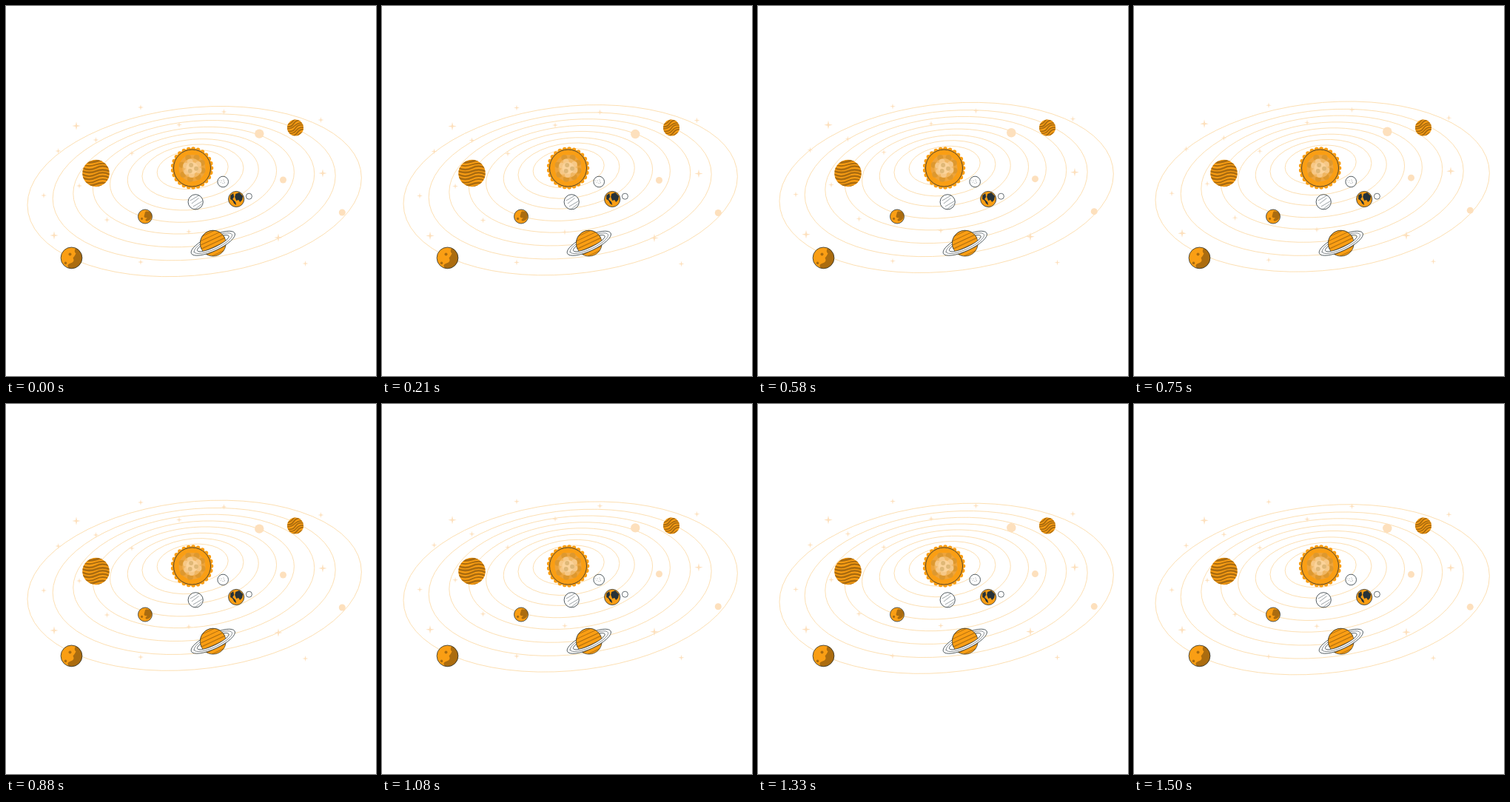
An HTML page for the animation above (1.54 s loop, 500 by 500 pixels).

```html
<!DOCTYPE html>
<html lang="en">
<head>
<meta charset="utf-8">
<title>Planets</title>
<style>
  html, body { margin: 0; width: 100%; height: 100%; overflow: hidden; background: #fff; }
  svg { display: block; width: 100%; height: 100%; }
  .line { fill: none; stroke-linecap: round; }
</style>
</head>
<body>
<svg id="stage" viewBox="0 0 500 500"></svg>
<script>
const ORANGE = '#fa9e14', BROWN = '#ab6c0f', DARK = '#263238';
const LOOP = 1540;

let seed = 7;
const random = () => (seed = seed * 16807 % 2147483647) / 2147483647;
const range = (n, make) => Array.from({ length: n }, (_, i) => make(i)).join('');

const circle = (x, y, r, attrs = '') => `<circle cx="${x}" cy="${y}" r="${r}" ${attrs}/>`;
const disc = (r, color) => circle(0, 0, r, `fill="${color}"`);
const rim = (r, width) => circle(0, 0, r, `fill="none" stroke="${DARK}" stroke-width="${width}"`);
const fill = (d, color) => `<path d="${d}" fill="${color}"/>`;
const line = (d, color, width) =>
  `<path class="line" d="${d}" stroke="${color}" stroke-width="${width}"/>`;

// Evenly spaced spots of varying distance around the centre.
const spots = (n, near, far, size, color) => range(n, i => {
  const angle = (i + random() * 0.6) * 2 * Math.PI / n;
  const d = near + (far - near) * random();
  return circle(d * Math.cos(angle), d * Math.sin(angle), size, `fill="${color}"`);
});

// Parallel wavy bands across a globe of radius r.
const bands = (r, gap, width, swing, angle = 0) => `<g transform="rotate(${angle})">` +
  range(Math.ceil(2 * r / gap), i => {
    const y = gap * (i + 0.5) - r, bend = swing * (0.7 + 0.6 * random());
    return line(`M${-r} ${y}q${r / 2} ${bend} ${r} 0t${r} 0`, BROWN, width * (0.7 + 0.6 * random()));
  }) + '</g>';

// Orbits share one tilt; height and centre follow from the half width.
const orbit = w => `<ellipse rx="${w}" ry="${0.56 * w - 0.00025 * w * w}"
  transform="matrix(1 -.081 0 1 ${251.5 + 0.014 * w} ${213.3 + 0.166 * w})"/>`;

const star = r => ([x, y]) => {
  const q = r * 0.18, p = r - q;
  return `<path d="M${x} ${y - r}l${q} ${p} ${p} ${q} ${-p} ${q} ${-q} ${p}
    ${-q} ${-p} ${-p} ${-q} ${p} ${-q}z"/>`;
};
const bigStars = [[95, 162], [428, 226], [368, 313], [65, 310]];
const smallStars = [[182, 137], [70.5, 196], [121.5, 181], [234, 160.5], [294.5, 143], [425.5, 154],
  [404.5, 348], [247, 305], [182, 346], [136.5, 289], [51, 256], [99, 243], [170, 199]];

function planet(name, x, y, r, color, marks, outline = 0.8) {
  return `<g transform="translate(${x} ${y})">
    <clipPath id="${name}">${circle(0, 0, r)}</clipPath>
    ${disc(r, color)}<g clip-path="url(#${name})">${marks}</g>${rim(r, outline)}
  </g>`;
}

function sun() {
  return `<g transform="translate(251.5 219)">
    ${disc(26.6, ORANGE)}
    <circle r="26" fill="none" stroke="${ORANGE}" stroke-width="5.6" stroke-linecap="round"
      pathLength="25" stroke-dasharray="0 1"/>
    ${rim(25, 0.8)}
    ${disc(18, '#eda43c')}${spots(8, 14, 16, 4, '#dd982f')}
    ${disc(13, '#f0b661')}${spots(6, 8, 10, 4, '#f6c887')}
    ${disc(8, '#fbd39a')}${spots(3, 4, 6, 3, '#dfb877')}
  </g>`;
}

function saturn() {
  const globe = disc(17.4, ORANGE) + `<g clip-path="url(#globe)">${bands(17.4, 5, 1, 0)}</g>` + rim(17.4, 0.6);
  const ring = (rx, ry) => `M${-rx} 0a${rx} ${ry} 0 1 0 ${2 * rx} 0a${rx} ${ry} 0 1 0 ${-2 * rx} 0z`;
  return `<g transform="translate(279.8 320.7) rotate(-25)">
    <clipPath id="globe">${circle(0, 0, 17.4)}</clipPath>
    <clipPath id="upper"><path d="M-20-20H20V0H-20z"/></clipPath>
    ${globe}
    <path d="${ring(32.4, 10.2)}${ring(23.5, 5.6)}" fill="#fff" fill-rule="evenodd"
      stroke="${DARK}" stroke-width=".7"/>
    ${line(ring(28.2, 8), DARK, 0.5)}
    <g clip-path="url(#upper)">${globe}</g>
  </g>`;
}

const planets = [
  planet('jupiter', 121.5, 226, 18.2, ORANGE, bands(18.2, 4.4, 2.4, 4), 0),
  planet('uranus', 391, 164.5, 11, ORANGE, bands(11, 3.3, 1.7, 3, -22), 0),
  planet('mercury', 293.2, 237.5, 7.3, '#fff', spots(8, 1, 5, 0.4, DARK)),
  planet('venus', 256.2, 264.8, 10.1, '#fff',
    range(5, i => line(`M${-9 + 2 * i} ${4 * i - 6}l${9 + i % 2 * 3}-7`, '#59656b', 0.6))),
  planet('earth', 311.2, 261, 10.6, ORANGE,
    fill('M-8-5L-4-8-3-3-5 0-1 4 0 8-3 6-5 2-8 0z', DARK) +
    fill('M-1-7L4-9 9-4 8 1 5 4 3 1 0 2-2-3z', DARK)),
  planet('moon', 328.4, 257.2, 4, '#fff', '', 0.7),
  planet('mars', 188, 284.5, 9.5, ORANGE,
    fill('M0-6Q6-9 9-3 9 5 3 6 0 4 3 2-3 2-1-2z', BROWN) + spots(3, 5, 6, 1.6, BROWN)),
  planet('neptune', 88.5, 340.4, 14.4, ORANGE,
    fill('M7-15Q2-9 6-6 4-2 2 0 5 5-1 7-8 9-3 15L16 15V-15z', BROWN) +
    circle(-2, -5, 2, `fill="${BROWN}"`) + circle(-8, 7, 1.8, `fill="${BROWN}"`))
];

document.getElementById('stage').innerHTML = `
  <g id="orbits" fill="none" stroke="#fcd8a0" stroke-width=".8">
    ${[225.7, 191, 163, 136, 112.5, 88.5, 68.5, 48].map(orbit).join('')}
  </g>
  <g id="stars" fill="#fde0bd">
    ${bigStars.map(star(5.8)).join('')}${smallStars.map(star(4)).join('')}
    ${circle(342.3, 172.6, 6.2)}${circle(374.5, 235, 4.5)}${circle(454.3, 279, 4.5)}
  </g>
  ${sun()}${planets.join('')}${saturn()}`;

const orbitLayer = document.getElementById('orbits');
const starLayer = document.getElementById('stars');
const wave = t => 3 * Math.cos(Math.PI * (t - 190) / 1050);
const shift = (layer, y) => layer.setAttribute('transform', `translate(0 ${y.toFixed(3)})`);

const start = performance.now();
function draw(now) {
  const t = Math.max(0, now - start) % LOOP;
  // Orbits bob linearly; the stars drift on a slower wave that restarts with the loop.
  shift(orbitLayer, -6.8 * Math.max(0, 1 - Math.abs(t - 740) / 760));
  shift(starLayer, wave(t) - wave(0));
  requestAnimationFrame(draw);
}
draw(start);
</script>
</body>
</html>
```
